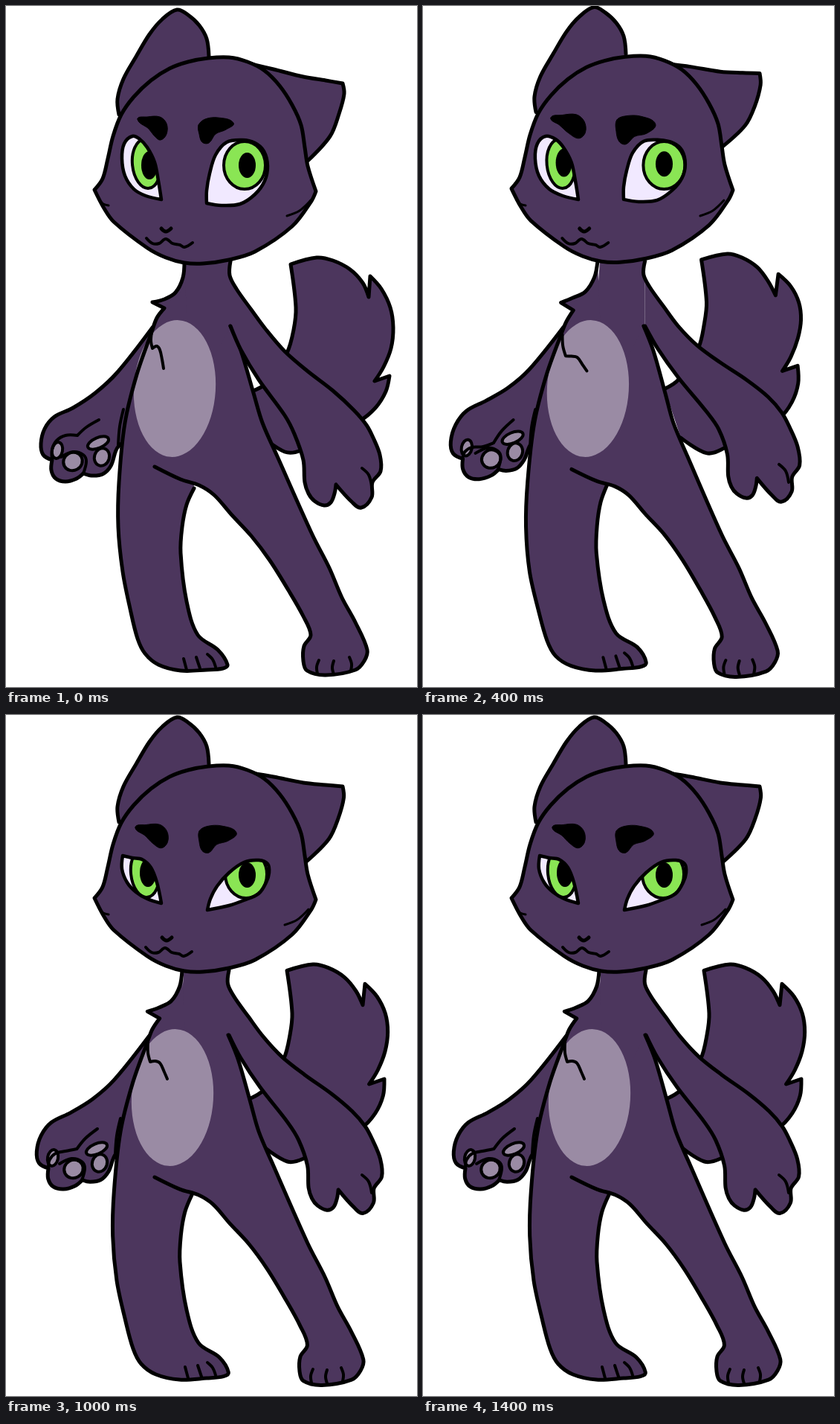
These frames come from a looping animation (553x915 px, 1600 ms). An HTML page with a canvas:

```html
<!DOCTYPE html>
<html lang="en">
<head>
<meta charset="utf-8">
<title>Swaying cat</title>
<style>
html, body { margin: 0; width: 100%; height: 100%; overflow: hidden; background: #fff; }
canvas { display: block; }
</style>
</head>
<body>
<canvas id="stage" width="553" height="915"></canvas>
<script>
const g = document.getElementById('stage').getContext('2d');
const FUR = '#4c365d', PALE = '#9a8ba4', GREEN = '#8ae554', WHITE = '#f1e9ff', INK = '#000';
const SWAY = [0, 1, 1.7, 1];
let lean = 0; // 0 = rest pose, 1 = leaning, beyond 1 = further along

const points = s => s.split(' ').map(t => t.split(',').map(parseFloat));

// Offset at fraction t of a curve, blended between evenly spread key offsets.
function shift(keys, t) {
  const at = t * (keys.length - 1), i = Math.floor(at), f = at - i;
  const a = keys[i], b = keys[i + 1] || a;
  return [0, 1].map(c => lean * (a[c] + (b[c] - a[c]) * f));
}

// Smooth curve through points; "*" marks a corner, a final "z" closes it.
// "move" holds a few key offsets that carry the curve along with the lean.
function curve(text, move = '0,0') {
  const closed = text.endsWith(' z');
  if (closed) text = text.slice(0, -2);
  const sharp = text.split(' ').map(t => t.endsWith('*'));
  const keys = points(move), n = sharp.length;
  const p = points(text).map(([x, y], i) => {
    const [dx, dy] = shift(keys, i / (n - 1));
    return [x + dx, y + dy];
  });
  const dir = p.map((_, i) => {
    if (sharp[i] || (!closed && (i === 0 || i === n - 1))) return [0, 0];
    const u = p[(i + n - 1) % n], v = p[(i + 1) % n];
    const d = Math.hypot(v[0] - u[0], v[1] - u[1]) || 1;
    return [(v[0] - u[0]) / d, (v[1] - u[1]) / d];
  });
  const path = new Path2D();
  path.moveTo(...p[0]);
  for (let i = 0; i < (closed ? n : n - 1); i++) {
    const j = (i + 1) % n, [x, y] = p[i], [X, Y] = p[j];
    const d = Math.hypot(X - x, Y - y) / 3;
    path.bezierCurveTo(x + dir[i][0] * d, y + dir[i][1] * d, X - dir[j][0] * d, Y - dir[j][1] * d, X, Y);
  }
  if (closed) path.closePath();
  return path;
}

function oval(x, y, rx, ry, turn = 0, dx = 0, dy = 0) {
  const path = new Path2D();
  path.ellipse(x + dx * lean, y + dy * lean, rx, ry, turn, 0, 7);
  return path;
}

function draw(path, fill, width = 5) {
  if (fill) { g.fillStyle = fill; g.fill(path); }
  if (width) { g.lineWidth = width; g.stroke(path); }
}

const line = (text, move, width = 4) => draw(curve(text, move), null, width);

function tail() {
  draw(curve(
    '330,518 350,507 378,466 387,435 390,405 383,347* 418,338 440,342 463,354 480,372 488,391* 490,363* 505,380 517,405 521,432 518,460 508,485 496,504* 516,497* 511,518 497,540 475,558 397,597 375,599 340,575',
    '-3,-2 -5,-5 -5,-3 -9,-1 -6,-2 -8,-8 -7,-8 3,-3 4,3'), FUR);
}

function leftArm() {
  draw(curve(
    '197,432 150,492 120,520 90,540 65,552 52,568 47,588 50,603 62,610* 61,624 67,635 80,639 95,635 104,628* 115,631 130,629 141,618 151,592 190,560 205,440',
    '-5,0 -3,-6 -6,-1 -4,-1 -1,-3 -3,-5 -2,0'), FUR);
  draw(oval(124, 587, 15, 7, -.4, -2, -4), PALE, 4);
  draw(oval(69, 597, 7, 11, .2, -6, -2), PALE, 4);
  draw(oval(90, 612, 13, 12, -.5, 1, -2), PALE, 4);
  draw(oval(129, 606, 10, 12, .3, -3, -4), PALE, 4);
  line('125,556 108,566 96,577* 80,577 68,584 62,596 62,610', '-2,0 0,9 -5,-2');
  line('74,606 90,599 104,603 108,612 104,628', '-2,-3');
  line('158,542 153,565 151,590', '-4,0');
}

function body() {
  draw(curve('242,335* 302,335* 302,430* 318,475* 260,640* 205,600* 205,430* 238,390* z', '-2,0'), FUR, 0);
  const left = curve(
    '240,343 238,365 228,385 213,394 197,398* 213,406* 203,419 196,438 176,495 160,560 152,640 151,700 157,760 167,810 177,850 187,870 205,885 235,893 270,892 292,890 298,885 285,865 258,845 243,800 235,735 237,700 243,670 253,648',
    '-3,0 -7,-1 -6,3 -6,0 -8,0 -5,2 0,-1 2,-2 -1,0 -3,-3');
  const right = curve(
    '200,619 235,636 260,644 280,657 303,683 330,712 355,745 380,785 400,820 410,845 401,860 400,880 405,893 430,899 470,892 482,880 486,865 470,828 452,795 435,755 412,710 365,605 345,560 333,520 316,463 302,430',
    '0,2 -3,-1 -5,2 -5,1 -6,0 -3,0');
  draw(left, FUR, 0);
  draw(right, FUR, 0);
  draw(oval(227, 514, 55, 92, .06, -3), PALE, 0);
  draw(left);
  draw(right);
  line('196,438 195,450 197,460* 203,457 207,462 210,475 212,487', '-5,2 -2,8 5,2');
  line('239,877 243,892', '2,-1');
  line('256,875 261,890', '2,-1');
  line('271,871 278,878 282,888', '0,-1');
  line('421,879 418,888 419,897', '-8,0');
  line('441,880 439,889 441,898', '-9,0');
  line('462,875 465,884 464,893', '-11,2');
}

function rightArm() {
  draw(curve(
    '302,343 301,362 310,380 330,408 350,435 375,464 405,490 440,517 468,543 485,563 494,580 503,603 504,625 493,640 492,660 478,674 465,666 444,643* 442,655 437,667 428,671 415,665 407,655 402,640 400,610 388,575 375,550 340,502 316,462 302,430',
    '-2,0 -4,-3 -2,-11 2,-4 3,-5 4,-6 6,-4 -2,0'), FUR);
  line('479,621 488,630 492,645', '0,-3');
}

function head() {
  draw(curve('152,146 150,125 158,98 175,68 193,38 210,18 230,5 245,12 260,26 270,44 273,68', '0,-2'), FUR);
  draw(curve('330,78 360,85 400,95 430,100 453,104* 455,118 448,145 436,175 406,208',
    '0,0 0,-4 0,-8 -1,-6 -2,-11'), FUR);
  draw(curve(
    '272,70 300,69 325,75 348,87 368,107 385,133 397,160 402,190 406,215 417,249* 411,262 385,296 335,330 300,341 265,346 240,345 215,338 190,325 145,290 132,272 119,247* 130,232 137,205 144,175 155,146 172,122 195,100 220,84 245,75 z',
    '0,-1'), FUR);
  line('126,261 131,266 138,268', '0,0', 3);
  line('378,282 395,275 410,261', '-3,0', 3);
  line('209,299 215,303 222,299', '1,0', 5);
  line('189,312 197,319 206,319 215,313 224,319 234,321 240,324 251,318', '-1,0');
  draw(curve('177,152 190,149 207,149 216,158 216,172 208,180 200,175 192,165 z', '-3,-1 0,-2 2,-1 -5,-3'), INK, 1);
  draw(curve('259,160 268,152 285,150 306,157 296,166 282,172 273,184 264,183 260,172 z',
    '1,-4 5,-1 3,3 0,1 0,-2'), INK, 1);
}

function eye(shape, iris, pupil) {
  draw(shape, WHITE, 0);
  g.save();
  g.clip(shape);
  draw(iris, GREEN, 4);
  draw(pupil, INK, 0);
  g.restore();
  draw(shape, null, 4.5);
}

// lid: 0 = open, 1 = half closed, 2 = shut
function eyes(lid) {
  if (lid === 2) {
    line('156,212 165,230 185,245 209,254', '0,0', 5);
    line('271,262 300,257 322,249 340,239 353,216', '0,0', 5);
    return;
  }
  const left = lid
    ? curve('157,189* 170,192 183,194 195,205 203,225 209,253* 190,247 175,238 163,225 156,207 z')
    : curve('170,175 159,185 156,205 160,228 172,246 188,255 209,260* 205,235 200,210 190,190 180,179 z',
        '-3,0 -3,0 0,0 0,0 -1,0');
  const right = lid
    ? curve('271,262* 275,247 284,230 300,212 320,198 340,195 352,200 354,212 350,225 340,240 320,249 300,256 z')
    : curve('318,180 297,183 282,200 274,225 270,248 270,265* 290,268 315,266 335,253 348,235 352,215 347,195 335,184 z',
        '0,0 0,-3 0,-3 1,0');
  eye(left, oval(189, 212, 19, 33, -.1, -2), oval(193, 214, 11, 19, 0, -2, -2));
  eye(right, oval(321, 214, 28, 32, 0, 2), oval(324.5, 214 + lid * 2, 11.5, 17, 0, 0, -1));
}

function frame() {
  const step = Math.floor(performance.now() / 200) % 8;
  lean = SWAY[step % 4];
  g.fillStyle = '#fff';
  g.fillRect(0, 0, 553, 915);
  g.strokeStyle = INK;
  g.lineCap = g.lineJoin = 'round';
  tail();
  leftArm();
  body();
  rightArm();
  head();
  eyes(Math.max(0, 2 - Math.abs(step - 6))); // one blink per loop
  requestAnimationFrame(frame);
}
frame();
</script>
</body>
</html>
```
